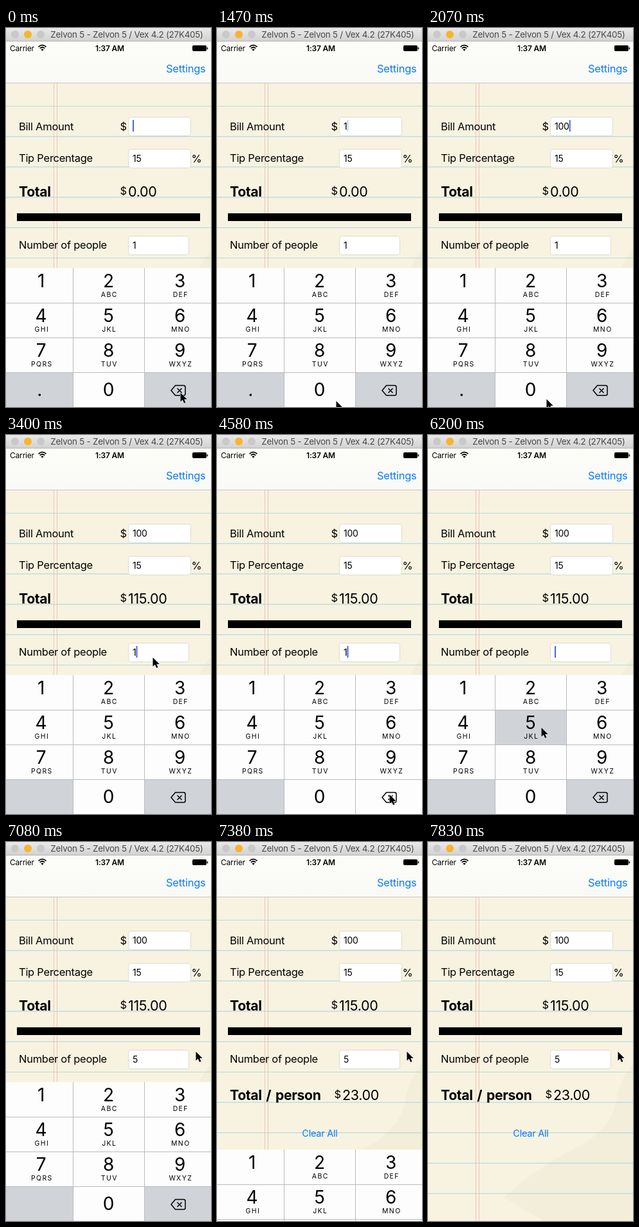
These frames come from a looping animation (319x589 px, 8 s). An HTML page:

```html
<!DOCTYPE html>
<html lang="en">
<head>
<meta charset="utf-8">
<style>
  html, body { margin: 0; width: 100%; height: 100%; overflow: hidden; }
  svg { display: block; width: 319px; height: 589px; }
  text { font: 16.5px Inter, sans-serif; letter-spacing: -.016em; white-space: pre; }
  .mid { text-anchor: middle; }
  .small { font-size: 12px; }
  .clock { font-weight: 600; }
  .title { font-size: 13.4px; fill: #484848; }
  .field { font-size: 14px; }
  .total { font-size: 21.2px; font-weight: 700; word-spacing: 2px; }
  .sum { font-size: 21.5px; }
  .link { fill: #0a7aff; }
  .clear { font-size: 14.5px; }
  .digit { font-size: 28px; }
  .abc { font-size: 10.5px; letter-spacing: 1.4px; }
</style>
</head>
<body>
<svg id="stage" viewBox="0 0 319 589">
  <defs>
    <linearGradient id="chrome" x2="0" y2="1"><stop stop-color="#e9e9e9"/><stop offset="1" stop-color="#d1d1d1"/></linearGradient>
    <linearGradient id="nav" x2="0" y2="1"><stop stop-color="#fdfdf8"/><stop offset="1" stop-color="#f9f9f7"/></linearGradient>
  </defs>
</svg>
<script>
const DURATION = 8000, TICK = 147.7;
const KEY_WHITE = '#fdfdfd', KEY_GREY = '#d0d4d8';
const stage = document.getElementById('stage');
const $ = id => document.getElementById(id);

const rect = (x, y, w, h, fill, extra = '') =>
  `<rect x="${x}" y="${y}" width="${w}" height="${h}" fill="${fill}" ${extra}/>`;
const text = (x, y, content, cls = '', id = '') =>
  `<text x="${x}" y="${y}" class="${cls}" id="${id}">${content}</text>`;
const line = (d, color, width = 1) => `<path d="${d}" fill="none" stroke="${color}" stroke-width="${width}"/>`;
const field = (y, w, value, id) =>
  rect(190.5, y + .5, w, 29, '#fff', 'rx="4" stroke="#dedbd0"') + text(197, y + 19.5, value, 'field', id);

function paper() {
  let s = rect(0, 85, 319, 504, '#f7f3e0') +
    '<path d="M319 345Q300 365 292 405T240 470Q170 505 118 552L180 589H319Z" fill="#f2eed9"/>';
  for (let i = 0; i < 10; i++) s += line(`M0 ${121.5 + i * 47.2}H319`, '#b6dae2', 1.2);
  return s + line('M74.5 85V589M79.5 85V589', '#eec4b8');
}

function header() {
  const buttons = ['#c9c9c9', '#f9b42d', '#c9c9c9'].map((color, i) =>
    `<circle cx="${14 + 20 * i}" cy="10" r="6" fill="${color}"/>`).join('');
  return rect(0, 0, 319, 21, 'url(#chrome)') + line('M0 20.5H319', '#b5b5b5') + buttons +
    text(188, 15, 'Zelvon 5 - Zelvon 5 / Vex 4.2 (27K405)', 'title mid') +
    rect(0, 21, 319, 64, 'url(#nav)') + line('M0 85.5H319', '#c9c7bd') +
    text(6, 35.5, 'Carrier', 'small') +
    line('M50.5 29.3Q56.5 24 62.5 29.3M52.7 31.7Q56.5 28.3 60.3 31.7', '#000', 1.7) +
    '<path d="M54.3 33.3Q56.5 31.5 58.7 33.3L56.5 35.8Z"/>' +
    text(161.5, 35.5, '1:37 AM', 'small mid clock') +
    rect(290, 27, 22, 9, '#000', 'rx="2"') + rect(312.7, 30, 1.5, 3.5, '#000', 'rx=".7"') +
    text(249, 69, 'Settings', 'link');
}

function form() {
  return text(20, 158.5, 'Bill Amount') + text(177.4, 158.5, '$') + field(138, 97, '', 'bill') +
    text(20, 207.5, 'Tip Percentage') + field(188, 97, '15') + text(288.5, 208.5, '%') +
    text(20, 261.5, 'Total', 'total') + text(177.4, 259, '$') + text(190, 261.5, '', 'sum', 'total') +
    rect(17, 288, 285, 12, '#000') +
    text(20, 342.5, 'Number of people') + field(323, 94, '', 'people') +
    text(20, 400.5, 'Total / person', 'total') + text(182.5, 398, '$') + text(195, 400.5, '23.00', 'sum') +
    text(160, 458, 'Clear All', 'link mid clear') +
    rect(197, 0, 2, 18, '#4768e0', 'id="caret"');
}

function keypad() {
  const labels = ['1', '2 ABC', '3 DEF', '4 GHI', '5 JKL', '6 MNO', '7 PQRS', '8 TUV', '9 WXYZ', '.', '0', 'del'];
  const left = [0, 104.5, 215.5, 319], center = [54.4, 159.4, 270.4];
  let s = '';
  labels.forEach((label, i) => {
    const col = i % 3, y = 373 + 54 * Math.floor(i / 3);
    const [digit, letters = ''] = label.split(' ');
    s += rect(left[col], y, left[col + 1] - left[col], 54, KEY_WHITE, `id="key-${digit}"`);
    if (digit === 'del') {
      s += line('M263.5 555.5H276.5Q279 555.5 279 558V568.5Q279 571 276.5 571H263.5L257 563.3ZM266.5 560L273.5 567M273.5 560L266.5 567', '#000', 1.5);
    } else {
      s += text(digit === '.' ? 52 : center[col], y + (i > 8 ? 37 : 30), digit, 'digit mid', 'label-' + digit);
      s += text(center[col] + 1.4, y + 45, letters, 'abc mid');
    }
  });
  return `<g id="keypad">${s}${line('M0 427.5H319M0 481.5H319M0 535.5H319M104.5 373V589M215.5 373V589', '#b9bbbd')}</g>`;
}

stage.innerHTML += paper() + form() + keypad() + header() +
  '<path id="pointer" d="M.5 .7v14l3.3-3 2.3 5.3 2.4-1-2.2-5.1h4.4z" stroke="#fff" paint-order="stroke"/>';

// Keyed by tick: [tick, value...]
const bill = [[0, ''], [6, '1'], [12, '10'], [14, '100']];
const people = [[0, '1'], [32, ''], [43, '5']];
const presses = [[5, '1'], [11, '0'], [13, '0'], [31, 'del'], [42, '5']];
const caretResets = [[0], [6], [12], [14], [23], [32], [43]];
const drop = [[48, 0], [49, 12], [50, 105], [51, 188], [52, 213], [53, 216]];
const route = [
  [0, 271, 566], [1, 245, 545], [3, 105, 418], [4, 80, 398], [6, 80, 398], [8, 150, 535], [9, 180, 573],
  [10, 185, 579], [14, 184, 576], [15, 212, 345], [16, 212, 345], [18, 194, 335], [21, 228, 345],
  [25, 228, 345], [27, 236, 375], [29, 262, 515], [31, 268, 558], [33, 268, 558], [34, 260, 535],
  [36, 185, 463], [37, 176, 454], [43, 176, 454], [44, 190, 436], [46, 284, 336], [47, 295, 325]
];

const latest = (track, tick) => track.filter(k => k[0] <= tick).pop() || track[0];

function pointerAt(tick) {
  const [t0, x0, y0] = latest(route, tick);
  const next = route.find(k => k[0] > tick);
  if (!next) return [x0, y0];
  const f = (tick - t0) / (next[0] - t0);
  return [x0 + f * (next[1] - x0), y0 + f * (next[2] - y0)];
}

function draw(time) {
  const tick = Math.floor(time % DURATION / TICK + .08);
  const onPeople = tick >= 23;
  $('bill').textContent = latest(bill, tick)[1];
  $('people').textContent = latest(people, tick)[1];
  $('total').textContent = onPeople ? '115.00' : '0.00';

  const blink = (tick - latest(caretResets, tick)[0]) % 7;
  const caret = $('caret');
  caret.setAttribute('x', 197 + $(onPeople ? 'people' : 'bill').getComputedTextLength());
  caret.setAttribute('y', onPeople ? 328 : 143);
  caret.setAttribute('opacity', tick >= 48 || blink > 4 ? 0 : blink === 4 ? .3 : 1);

  const pressed = presses.find(p => p[0] === tick);
  for (const key of '1 2 3 4 5 6 7 8 9 . 0 del'.split(' ')) {
    const isGrey = (key === '.' || key === 'del') !== (!!pressed && pressed[1] === key);
    $('key-' + key).setAttribute('fill', isGrey ? KEY_GREY : KEY_WHITE);
  }
  $('label-.').setAttribute('opacity', onPeople ? 0 : 1);
  $('keypad').setAttribute('transform', `translate(0 ${latest(drop, tick)[1]})`);
  $('pointer').setAttribute('transform', `translate(${pointerAt(tick)})`);
}

const start = performance.now();
function loop() {
  draw(performance.now() - start);
  requestAnimationFrame(loop);
}
loop();
</script>
</body>
</html>
```
